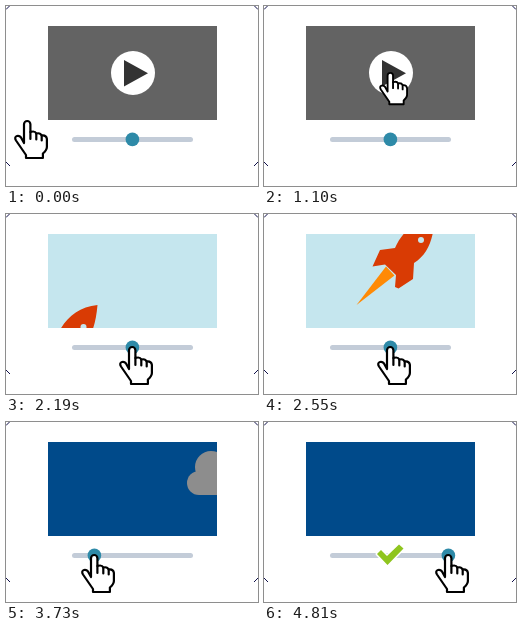
An HTML page that plays this animation: 252x180 px, repeating every 5510 ms.

```html
<!DOCTYPE html>
<html lang="en">
<head>
<meta charset="utf-8">
<title>Video slider</title>
<style>
  html, body { margin: 0; width: 100%; height: 100%; overflow: hidden; background: #fff; }
  svg { display: block; width: 100vw; height: 100vh; }
</style>
</head>
<body>
<svg viewBox="0 0 252 180">
  <defs>
    <clipPath id="screen"><rect x="42" y="20" width="169" height="94"/></clipPath>
  </defs>

  <path d="M0 3.500L3.500 0M248.500 0L252 3.500M0 156L4 160M252 156L248 160" stroke="#10104a"/>

  <g clip-path="url(#screen)">
    <rect id="video" x="42" y="20" width="169" height="94"/>
    <g id="play">
      <circle cx="127" cy="67" r="22" fill="#fff"/>
      <path d="M118 54V80.500L142 67.200Z" fill="#333"/>
    </g>
    <g id="rocket">
      <path d="M122 52.500L92.500 91L130.500 61.500Z" fill="#ff8a05"/>
      <path d="M171 4C151 6 138 18 131 34L116 36L108.500 52.500L121 50.500L132 61L131 73L134.500 74.500L149 65L150 49C164 40 169 26 171 4Z" fill="#d93b04"/>
      <circle cx="157" cy="26" r="3" fill="#c5e6ee"/>
    </g>
    <g id="cloud" fill="#8d8d8d">
      <circle cx="24" cy="16" r="16"/>
      <circle cx="44" cy="15.500" r="7.500"/>
      <rect y="20" width="60" height="24" rx="12"/>
    </g>
  </g>

  <rect x="66" y="131" width="121" height="5" rx="2.500" fill="#c3ccd8"/>
  <circle id="knob" cy="133.400" r="6.800" fill="#2e8aa8"/>
  <path id="check" d="M113 132L117 128L123 134L135 122.500L139.500 126.500L123.500 143Z"
        fill="#8fc51f" stroke="#fff" stroke-width="3" stroke-linejoin="round" paint-order="stroke"/>

  <g id="hand" stroke="#000" stroke-width="2.200" stroke-linejoin="round" stroke-linecap="round">
    <path fill="#fff" d="M10 23V4.200a3.200 3.200 0 0 1 6.400 0V12q4.500-1.500 5.900 1.500q4-1 5.400 2q4.700-.5 5.200 3.500V27q0 3-4 6.500V38H12V35L2 20.500q-2-3.500 1-4.500q2.500-.5 4 1.500z"/>
    <path fill="none" d="M16.400 12v7M22.300 13.500v6M27.700 15.500v5"/>
  </g>
</svg>

<script>
const LOOP = 5510, STEP = 120;
const REST = { x: 8, y: 114 }, SLIDER_Y = 132;

// steps, distance, and a bend: x eases by it, y by its inverse
const glides = [
  { at: 500, steps: 5, dx: 105, dy: -48, bend: 1.16 },
  { at: 1770, steps: 2, dx: 0, dy: 66, bend: 1 },
  { at: 2790, steps: 2, dx: -38, dy: 0, bend: 1 },
  { at: 4330, steps: 4, dx: 96, dy: 0, bend: .87 }
];
const presses = [[1100, 1220], [2670, 3030], [4210, 4810]];

const $ = id => document.getElementById(id);
const show = (id, on) => $(id).setAttribute('display', on ? 'inline' : 'none');
const move = (id, x, y, more = '') => $(id).setAttribute('transform', `translate(${x} ${y})${more}`);
const stepsSince = (t, start) => Math.floor((t - start) / STEP);

function handAt(t) {
  let { x, y } = REST;
  for (const g of glides) {
    const k = Math.min(1, Math.max(0, (stepsSince(t, g.at) + 1) / g.steps));
    x += g.dx * k ** g.bend;
    y += g.dy * k ** (1 / g.bend);
  }
  return { x, y };
}

function draw(t) {
  const { x, y } = handAt(t);
  const pressed = presses.some(([from, to]) => t >= from && t < to);
  move('hand', x, y, pressed ? ' translate(14 0) scale(.85) translate(-14 0)' : '');
  $('knob').setAttribute('cx', y === SLIDER_Y ? x + 13.4 : 126.4);

  $('video').setAttribute('fill', t < 1470 ? '#636363' : t < 3730 ? '#c5e6ee' : '#004a8a');
  show('play', t < 1470);

  const r = stepsSince(t, 2190) - 3;
  show('rocket', t >= 2190 && t < 2910);
  move('rocket', r * 26.5, r * -29);

  show('cloud', t >= 3730 && t < 4810);
  move('cloud', 181 - stepsSince(t, 3730) * 26.6, 29);

  show('check', t >= 4810);
}

const start = performance.now();
function tick() {
  draw((performance.now() - start) % LOOP);
  requestAnimationFrame(tick);
}
tick();
</script>
</body>
</html>
```
